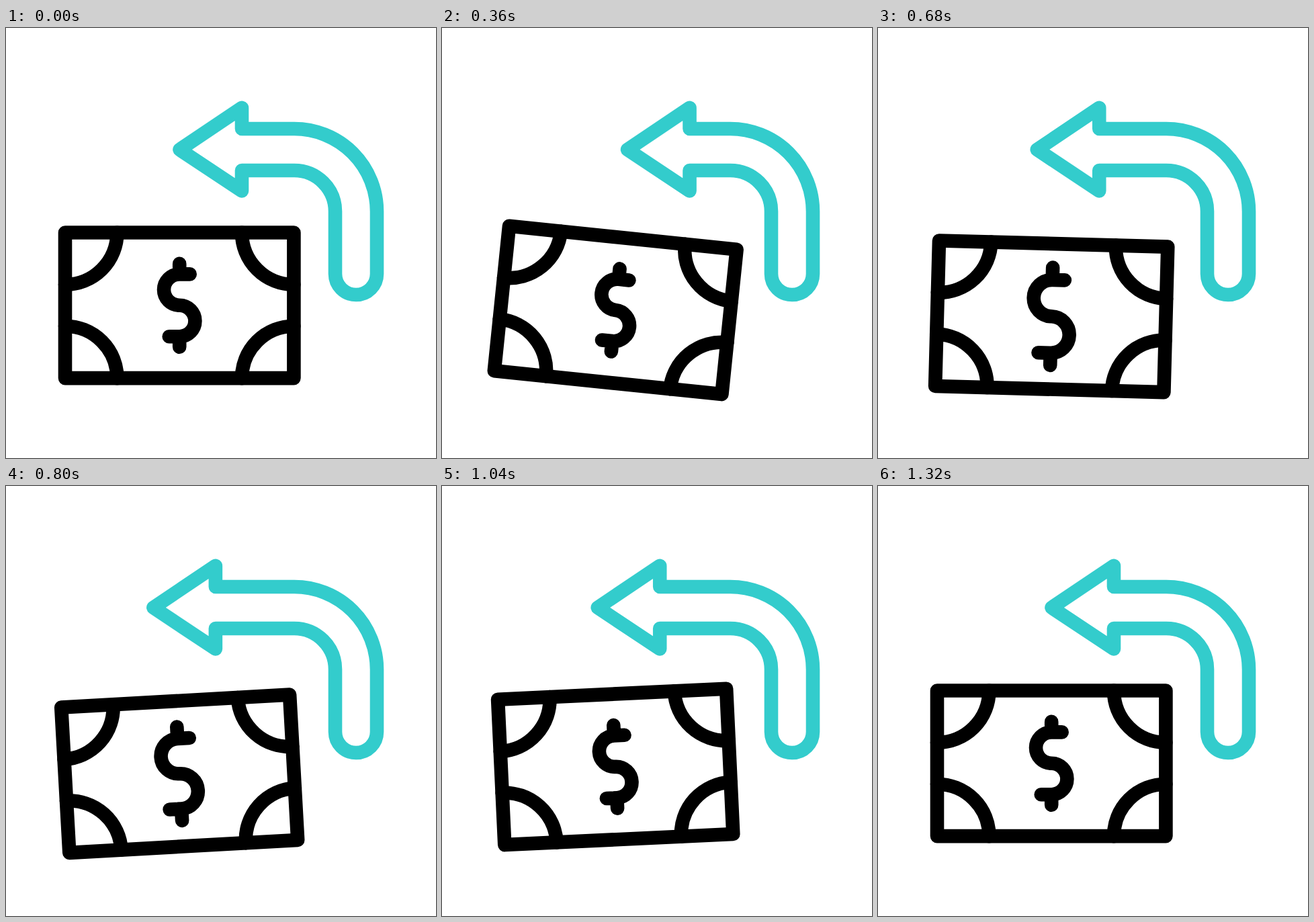
Write an HTML page that moves like this. It is 640x640 px and loops after 1400 ms.

```html
<!DOCTYPE html>
<html lang="en">
<head>
<meta charset="utf-8">
<title>Cash back</title>
<style>
  html, body { margin: 0; width: 100%; height: 100%; overflow: hidden; background: #fff; }
  svg { display: block; width: 100%; height: 100%; }
  path, rect { fill: none; stroke-width: 20.6; stroke-linecap: round; stroke-linejoin: round; }
  #arrow { stroke: #33cccc; }
  #bill { stroke: #000; }
  #dollar path { vector-effect: non-scaling-stroke; }
</style>
</head>
<body>
<svg viewBox="0 0 640 640">
  <path id="arrow"/>
  <g id="bill">
    <rect x="-170.2" y="-108.3" width="340.4" height="216.6"/>
    <path d="M-92.8-108.3A77.4 77.4 0 0 1-170.2-30.9M92.8-108.3A77.4 77.4 0 0 0 170.2-30.9
             M-92.8 108.3A77.4 77.4 0 0 0-170.2 30.9M92.8 108.3A77.4 77.4 0 0 1 170.2 30.9"/>
    <g id="dollar">
      <path d="M0-61.9V-46.4M15.5-46.4H0A23.2 23.2 0 0 0 0 0A23.2 23.2 0 0 1 0 46.4H-15.5M0 46.4V61.9"/>
    </g>
  </g>
</svg>
<script>
const LOOP = 1400, STEP = 40;
const [arrow, bill, dollar] = ['arrow', 'bill', 'dollar'].map(id => document.getElementById(id));

// Keys are [time, value] pairs
const tracks = {
  slide: [[80, 0], [440, 19.1], [840, -40], [1325, 0]],
  turn: [[80, 0], [480, 7], [880, -3.9], [1280, 0]],
  drop: [[80, 0], [680, 16.5], [1280, 0]],
  grow: [[360, 1], [680, 1.174], [1000, 1]]
};

// cubic-bezier(.5, 0, .5, 1)
function ease(x) {
  let lo = 0, hi = 1;
  for (let i = 0; i < 24; i++) {
    const s = (lo + hi) / 2;
    if (1.5 * s * (1 - s) + s ** 3 < x) lo = s; else hi = s;
  }
  return lo * lo * (3 - 2 * lo);
}

function valueAt(keys, t) {
  if (t <= keys[0][0]) return keys[0][1];
  for (let i = 1; i < keys.length; i++) {
    const [t0, a] = keys[i - 1], [t1, b] = keys[i];
    if (t < t1) return a + (b - a) * ease((t - t0) / (t1 - t0));
  }
  return keys[keys.length - 1][1];
}

function arrowPath(dx) {
  const neck = 351 + dx, tip = 258.5 + dx;
  return `M${neck} 150H429A123 123 0 0 1 552 273V366A31 31 0 0 1 490 366V273` +
    `A61 61 0 0 0 429 212H${neck}V242.5L${tip} 181L${neck} 118.8Z`;
}

function draw() {
  const now = performance.now() + 4;
  const t = Math.floor(now % LOOP / STEP) * STEP;
  const at = name => valueAt(tracks[name], t);
  arrow.setAttribute('d', arrowPath(at('slide')));
  bill.setAttribute('transform', `translate(258.2 ${412.8 + at('drop')}) rotate(${at('turn')})`);
  dollar.setAttribute('transform', `scale(${at('grow')})`);
  requestAnimationFrame(draw);
}
draw();
</script>
</body>
</html>
```
